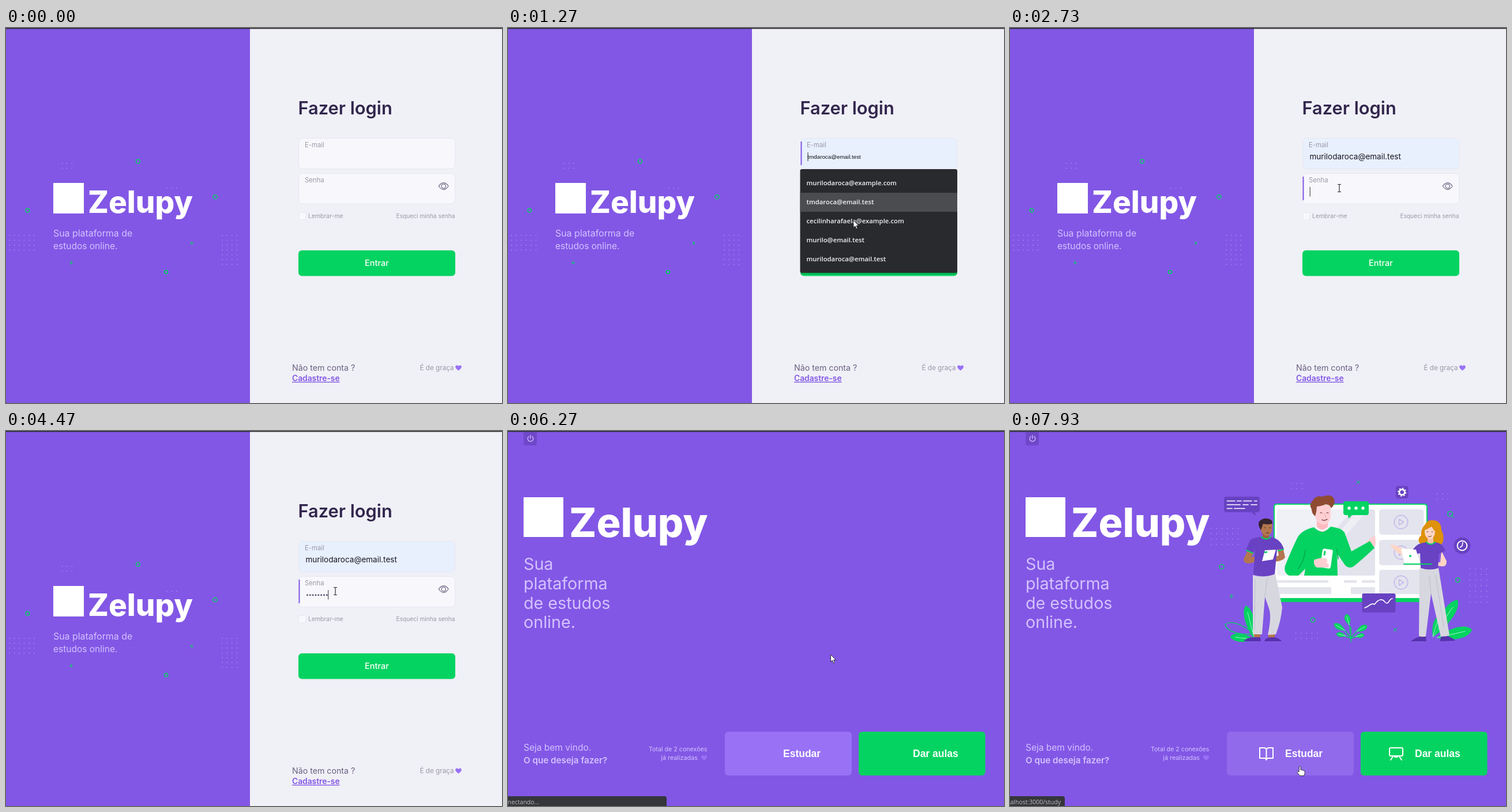
These frames come from a looping animation (860x651 px, 8000 ms). An HTML page:

```html
<!DOCTYPE html>
<html lang="pt-BR">
<head>
<meta charset="utf-8">
<title>Login</title>
<style>
html, body { margin: 0; width: 100%; height: 100%; overflow: hidden; background: #8257e5; }
svg { display: block; width: 860px; height: 651px; font-family: Inter, sans-serif; }
.sans { font-family: "Liberation Sans", sans-serif; }
.ui { font-family: "Open Sans", sans-serif; }
</style>
</head>
<body>
<svg id="stage" viewBox="0 0 860 651" xmlns="http://www.w3.org/2000/svg"></svg>
<script>
const GREEN = '#04d361', PURPLE = '#8257e5', DEEP = '#6842c2', LIGHT = '#9871f5', PALE = '#d4c2ff';
const GRAY = '#9c98a6', SKIN_A = '#b4764f', SKIN_B = '#ffcfd2', SKIN_C = '#ffd6c4';

// ---- markup helpers ----
const text = (x, y, size, str, fill, more = '') =>
  `<text x="${x}" y="${y}" font-size="${size}" fill="${fill}" ${more}>${str}</text>`;
const rect = (x, y, w, h, r, fill, more = '') =>
  `<rect x="${x}" y="${y}" width="${w}" height="${h}" rx="${r}" fill="${fill}" ${more}/>`;
const disc = (x, y, r, fill, more = '') => `<circle cx="${x}" cy="${y}" r="${r}" fill="${fill}" ${more}/>`;
const path = (d, fill, more = '') => `<path d="${d}" fill="${fill}" ${more}/>`;
const line = (d, color, w, more = '') =>
  path(d, 'none', `stroke="${color}" stroke-width="${w}" stroke-linecap="round" stroke-linejoin="round" ${more}`);
const group = (id, body, more = '') => `<g id="${id}" ${more}>${body}</g>`;

function dots(x, y, cols, rows, gap, r = 0.95) {
  let s = '';
  for (let j = 0; j < rows; j++)
    for (let i = 0; i < cols; i++) s += disc(x + i * gap, y + j * gap, r, '#a583f3');
  return s;
}
const ring = (x, y, r) => disc(x, y, r, 'none', `stroke="${GREEN}" stroke-width="1.5"`);
const cross = (x, y, r) =>
  line(`M${x - r} ${y - r}L${x + r} ${y + r}M${x + r} ${y - r}L${x - r} ${y + r}`, GREEN, 1.2);
const plus = (x, y, r) => line(`M${x - r} ${y}H${x + r}M${x} ${y - r}V${y + r}`, GREEN, 1.2);
const heart = (x, y, s) =>
  path('M0 5 C-3 2.6 -5.6 .8 -5.6 -1.8 C-5.6 -5.2 -1.4 -5.8 0 -3 C1.4 -5.8 5.600 -5.2 5.600 -1.8 C5.600 .8 3 2.6 0 5Z',
    LIGHT, `transform="translate(${x} ${y}) scale(${s})"`);

// A leaf from base to tip, widest past the middle; w is its half width.
function leaf(x1, y1, x2, y2, w, hollow) {
  const dx = x2 - x1, dy = y2 - y1, n = Math.hypot(dx, dy);
  const at = (u, v) => `${x1 + dx * u - dy / n * v} ${y1 + dy * u + dx / n * v}`;
  const d = `M${at(0, 0)}C${at(.35, w * 1.1)} ${at(.85, w * 1.5)} ${at(1, 0)}C${at(.85, -w * 1.5)} ${at(.35, -w * 1.1)} ${at(0, 0)}Z`;
  if (hollow) return line(d, GREEN, 1.4);
  return path(d, GREEN) + line(`M${at(0, 0)}L${at(.8, 0)}`, '#e8fff2', .7);
}
const sprig = (x, y, w) =>
  line(`M591 360Q${(x + 591) / 2} ${y + 2} ${x} ${y}`, GREEN, 1.4) +
  leaf(591 + (x - 591) * .35, 360 + (y - 360) * .55, x, y, w);

const brand = (x, y, side, tx, base, size) => rect(x, y, side, side, 0, '#fff') +
  text(tx, base, size, 'Zelupy', '#fff', 'font-weight="800"');

// ---- login page ----
const field = (id, y, label) =>
  rect(507.5, y + .5, 271, 53, 7, '#f8f8fc', `id="${id}Box" stroke="#e6e6f0"`) +
  rect(507.5, y + 6, 2, 41, 0, PURPLE, `id="${id}Bar"`) +
  text(518, y + 16, 11.3, label, GRAY);

const decor =
  dots(97.5, 235, 3, 2, 8.4) + dots(279, 278.3, 3, 1, 8.4) +
  dots(6, 360, 6, 4, 8.5) + dots(375, 360, 4, 7, 8.4) +
  ring(229, 231.5, 3.4) + ring(37.5, 316.7, 3.3) + ring(362.5, 293, 3.6) + ring(277.5, 423.5, 3.1) +
  cross(322, 373.5, 1.7) + plus(113, 407.5, 2.6);

const USERS = ['murilodaroca@example.com', 'tmdaroca@email.test', 'cecilinharafaela@example.com',
  'murilo@email.test', 'murilodaroca@email.test'];

const popup = group('popup',
  rect(507, 247, 272, 181, 3, '#000', 'opacity=".16"') +
  rect(506.5, 245, 272.5, 180, 3, '#292a2d') +
  rect(506.5, 253, 272.5, 33, 0, '#4b4c4f', 'id="pick"') +
  USERS.map((u, i) => text(517.5, 273.3 + 33 * i, 11.3, u, '#f1f3f4', 'class="ui" font-weight="600"')).join(''));

const login = group('login',
  rect(0, 0, 860, 651, 0, '#f0f0f7') + rect(0, 0, 423, 651, 0, PURPLE) + decor +
  brand(82, 269, 53, 142, 321, 53) +
  text(82, 362, 15.9, 'Sua plataforma de', PALE) + text(82, 384, 15.5, 'estudos online.', PALE) +
  text(506.5, 150, 30.8, 'Fazer login', '#32264d', 'font-weight="600"') +
  field('mail', 191, 'E-mail') + field('pass', 252, 'Senha') +
  text(519.5, 227.5, 13.5, USERS[4], '#16141d', 'id="mailText"') +
  text(519.5, 227.3, 9.75, '', '#111', 'id="preview" class="sans"') +
  rect(519.5, 216, 1, 15, 0, '#222', 'id="mailCaret"') +
  group('bullets', [...'00000000'].map((_, i) => disc(522.4 + 4.85 * i, 284.8, 1.55, '#5f5672')).join('')) +
  rect(520, 276, 1, 16.5, 0, '#333', 'id="passCaret"') +
  line('M750.2 274.5Q758.7 262.7 767.2 274.5Q758.7 286.3 750.2 274.5Z', '#6a6180', 1.2) +
  disc(758.7, 274.5, 3.7, 'none', 'stroke="#6a6180" stroke-width="1.2"') +
  rect(507.5, 320.5, 12.5, 12.5, 3, '#f8f8fc', 'stroke="#e6e6f0"') +
  text(524, 330.3, 10.4, 'Lembrar-me', GRAY) +
  text(778.5, 330.3, 10.2, 'Esqueci minha senha', GRAY, 'text-anchor="end"') +
  rect(507, 386, 272, 44.5, 6, GREEN, 'id="enter"') +
  rect(507, 385.5, 272, 45.2, 0, 'none', 'id="focus" stroke="#4f9fe0"') +
  text(643, 413, 14.5, 'Entrar', '#fff', 'text-anchor="middle" font-weight="500"') +
  text(496, 594.7, 14.2, 'Não tem conta ?', '#6a6180') +
  text(496, 613, 13.8, 'Cadastre-se', PURPLE, 'font-weight="600" text-decoration="underline"') +
  text(717.5, 594, 11.7, 'É de graça', GRAY) + heart(784.5, 590, .95) +
  popup);

// ---- home page ----
const play = y => rect(640, y - 22, 77.5, 44, 5, '#e4e4ef') +
  disc(678, y, 11.7, 'none', 'stroke="#c5bae8" stroke-width="1.7"') +
  line(`M674.5 ${y - 5}L682.5 ${y}L674.5 ${y + 5}Z`, '#c5bae8', 1.6);

const screen =
  rect(457, 126, 267, 171, 5, GREEN) + path('M459 132Q459 128 463 128H718Q722 128 722 132V290H459Z', '#fff') +
  rect(463, 136, 170, 115, 4, '#e3e3ed') +
  path('M463 140Q463 136 467 136H596L490 251H467Q463 251 463 247Z', '#f0f0f7') +
  path('M606 136H622L520 251H504Z', '#eeeef5') +
  play(158) + play(211) + play(263) + rect(638, 283, 82, 7, 0, '#fff') +
  rect(463, 259, 89, 4.5, 1, '#e4e4ee') + rect(579, 259, 22, 4.5, 1, '#e4e4ee') + rect(610, 259, 23, 4.5, 1, '#e4e4ee') +
  rect(463, 271, 94, 12, 1, '#e4e4ee') + rect(591, 271, 42, 12, 1, '#e4e4ee');

const teacher =
  path('M616 196Q622 187 629 184L633 181L634 194Q634 203 626 206Z', SKIN_B) +
  path('M527 167Q541 182 556 166Q574 168 580 176L592 209L624 191L632 203Q612 222 596 235Q588 240 581 233L567 212L568 251H510L512 239L500 251H484Q474 246 477 234Q488 206 499 184Q506 172 527 167Z', GREEN) +
  line('M512 207Q510 226 500 239M567 205L569 222', '#07a650', 1.6) +
  path('M532 154H551V166Q549 175 541 175Q534 174 532 167Z', '#ffb9bf') +
  line('M530 166Q541 180 554 165', '#f3f3f8', 3) +
  path('M528 132Q540 122 556 130L556 150Q552 164 543 163Q531 160 529 148Z', SKIN_B) +
  path('M529 148Q523 143 523 136Q518 128 524 122Q530 111 542 114Q557 108 562 118Q565 126 557 134Q555 128 548 127Q538 131 532 131Q532 139 529 148Z', '#8f4b32') +
  line('M538 142H541M549 142H552M541 154Q545 157 550 153', '#5a2b2b', 1.1) +
  line('M545 143L547 149', '#f2a0a6', 1) +
  rect(540, 205, 18, 33, 3, '#fff', 'transform="rotate(8 549 221)"') +
  path('M527 224Q536 219 548 221Q552 225 549 229Q556 231 551 237H532Q526 234 527 224Z', SKIN_B) +
  rect(544, 208, 3, 8, 1, GREEN, 'transform="rotate(8 545 212)"');

const student =
  path('M412 208L405 222Q405 230 414 230L444 223L441 216L418 219L423 211Z', SKIN_A) +
  path('M464 205L474 206L477 219Q474 226 456 227L455 220L466 216Z', SKIN_A) +
  path('M438 176H449V188H438Z', '#9c6242') +
  path('M435 184Q420 185 416 190L409 207L422 212L425 204L422 249Q440 255 459 249L463 206L475 205Q469 187 452 184Q443 190 435 184Z', DEEP) +
  line('M436 184Q444 191 452 184M410 207L421 212M465 208L474 205.5', GREEN, 2.2) +
  path('M433 161Q444 155 455 162L454 174Q451 183 444 182Q435 178 434 169Z', SKIN_A) +
  path('M435 172Q429 163 432 157Q438 151 446 152Q456 153 455 161Q446 163 439 161Z', '#35242f') +
  line('M441 168H443M450 168H452M444 177H449', '#442a22', 1) +
  path('M442 207L461 206L456 223L437 226Z', '#fff') + rect(441, 209, 5, 3, 1, GREEN, 'transform="rotate(-8 443 210)"') +
  path('M423 350H434V361H423ZM448 350H459V361H448Z', SKIN_A) +
  path('M421 250Q441 256 460 248Q466 276 472 306Q470 330 461 353L447 354Q454 322 449 308L442 288L437 353H421Z', '#d7d7e0') +
  line('M442 288L446 256M425 258L424 344', '#bcbccb', .9) +
  path('M405 365Q411 358 422 358H434L435 365ZM441 365Q443 357 458 358Q468 360 471 365Z', '#5632ad');

const girl =
  path('M719 163Q724 153 735 155Q748 157 748 172Q753 180 751 192Q747 201 738 197Q722 203 711 196Q705 188 713 181Q712 171 719 163Z', '#de9209') +
  path('M658 197L670 199L686 206L703 205L706 214L684 217Q672 214 658 197Z', SKIN_C) +
  path('M748 208L757 226Q757 236 749 235L727 232L730 227L746 228Z', SKIN_C) +
  path('M724 182H734V196H724Z', '#f5bfa8') +
  path('M722 193Q707 194 699 205L704 214L711 212L712 238Q728 243 742 238L744 213L755 208Q750 194 736 193Q730 199 722 193Z', DEEP) +
  line('M722 193Q730 200 737 193', GREEN, 1.8) +
  path('M719 168Q728 161 738 168L736 181Q731 190 727 188Q719 184 719 176Z', SKIN_C) +
  path('M717 173Q718 160 729 161Q740 163 740 177Q734 172 731 166Q725 170 717 173Z', '#de9209') +
  line('M723 175H725M731 175H733M725 183Q728 185 731 182', '#6b3b2c', 1) +
  path('M678 206Q678 204 681 204L704 206L711 230H684Z', '#fff') + disc(694, 217, 2, GREEN) +
  line('M683 231H731', GREEN, 2) +
  path('M711 352H720V361H711ZM749 352H758V361H749Z', SKIN_C) +
  path('M710 238Q727 243 743 238L762 355L747 358L730 282L721 356H709Z', '#d7d7e0') +
  line('M730 282L727 252M738 250L752 340', '#bcbccb', .9) +
  path('M696 364Q703 359 711 357H721L722 365H696ZM746 365L747 357L759 356Q769 360 772 364Z', '#5632ad');

const plants =
  leaf(424, 362, 409, 303, 8) + leaf(422, 352, 373, 336, 8, true) + leaf(425, 362, 382, 357, 7) + leaf(426, 350, 422, 318, 5) +
  leaf(733, 358, 776, 293, 10) + leaf(740, 359, 801, 345, 10) + leaf(733, 356, 744, 322, 6) +
  sprig(583, 318, 5) + sprig(562, 335, 5) + sprig(619, 338, 5) + sprig(566, 352, 4) + sprig(614, 354, 4) +
  line('M591 340V366', GREEN, 1.5);

const badges =
  path('M375 114H429Q433 114 433 118V137Q433 141 429 141H425L426 147L418 141H375Q371 141 371 137V118Q371 114 375 114Z', DEEP) +
  line('M376.5 121.5H390M394 121.5H401M405 121.5H419M424 121.5H428M376.5 128H399M404 128H413M418 128H428M376.5 134.5H385M389 134.5H407', '#fff', 1.7) +
  path('M582 122H618Q622 122 622 126V142Q622 146 618 146H593L587 152L586 146H582Q578 146 578 142V126Q578 122 582 122Z', GREEN) +
  [588, 600, 612].map(x => disc(x, 134, 2.7, '#fff')).join('') +
  rect(669, 95.5, 21.5, 21.5, 4, DEEP) + disc(679.7, 106.2, 4.6, 'none', 'stroke="#fff" stroke-width="2.6"') +
  disc(679.7, 106.2, 6.6, 'none', 'stroke="#fff" stroke-width="2" stroke-dasharray="2.6 2.58"') +
  disc(784, 199, 14.5, DEEP) + disc(784, 199, 8.3, 'none', 'stroke="#fff" stroke-width="2"') +
  line('M785 193.5L784 199.5L780.5 202', '#fff', 1.6) +
  rect(610.5, 282, 58, 33, 3, DEEP) +
  line('M615 307Q620 305 624 302T632 301Q637 294 642 293T650 297Q654 301 657 296T663 291', '#fff', 1.7);

const art = group('art',
  dots(488, 91, 3, 2, 9.3) + dots(740.5, 109, 3, 2, 9.3) + dots(349, 169, 6, 4, 9.3) +
  dots(797.5, 239.5, 4, 7, 9.6) + dots(495.5, 351, 5, 2, 9.3) +
  cross(604, 89, 2.2) + cross(668, 345, 2.2) + plus(384, 287, 3.3) +
  ring(367, 235.5, 3.9) + ring(525, 328, 3.9) + ring(776.5, 259, 3.9) + ring(763, 144, 4.2) + line('M766 147L769 150', GREEN, 1.5) +
  plants + screen + teacher + badges + student + girl);

const icons = group('icons',
  line('M444.5 553Q444 550 440 550H433V568H441Q444 568 444.5 571Q445 568 448 568H456V550H449Q445 550 444.5 553V570', '#fff', 2) +
  line('M660 550H679Q681 550 681 552V562Q681 564 679 564H660Q658 564 658 562V552Q658 550 660 550ZM664 565L660 571M675 565L679 571M667 566H672', '#fff', 2));

const status = (id, w, str, end) => group(id,
  path(`M0 634H${w - 4}Q${w} 634 ${w} 638V651H0Z`, '#35363a') +
  text(end, 648, 10.5, str, '#bdc1c6', 'class="ui" text-anchor="end"'));

const home = group('home',
  rect(0, 0, 860, 651, 0, PURPLE) +
  path('M27 2H50V21Q50 25 46 25H31Q27 25 27 21Z', '#6f48c9') +
  line('M36 9.5A4.8 4.8 0 1 0 42 9.5M39 7.5V13', PALE, 1.3) +
  art + brand(27, 115, 69, 106, 184, 70) +
  ['Sua', 'plataforma', 'de estudos', 'online.'].map((s, i) => text(27, 241 + 33.8 * i, 28.7, s, PALE)).join('') +
  text(27, 554.5, 15.5, 'Seja bem vindo.', PALE) +
  text(27, 576.7, 15.2, 'O que deseja fazer?', PALE, 'font-weight="600"') +
  text(345.5, 556, 10.7, 'Total de 2 conexões', PALE, 'text-anchor="end"') +
  text(329, 571, 10.8, 'já realizadas', PALE, 'text-anchor="end"') + heart(340, 567.3, .9) +
  rect(376, 522, 220, 76, 6, LIGHT, 'id="study"') + rect(608, 522, 219.5, 76, 6, GREEN) + icons +
  text(477, 566, 17.5, 'Estudar', '#fff', 'class="sans" font-weight="700"') +
  text(702, 566, 17.5, 'Dar aulas', '#fff', 'class="sans" font-weight="700"') +
  status('wait', 275, 'Conectando...', 54) + status('link', 95, 'localhost:3000/study', 88));

const cursors =
  group('arrow', path('M0 0V12.5L2.9 9.8L5 14.6L7 13.7L5 9.1H9Z', '#fff', 'stroke="#222" stroke-width=".9"')) +
  group('beam', line('M-2.5 -6.5H-.6M.6 -6.5H2.5M0 -6V6M-2.5 6.5H-.6M.6 6.5H2.5', '#222', 1.1)) +
  group('hand', path('M-.5 0Q1.3 -1.5 2 .5V5.5Q4 4.3 4.8 6Q6.5 5 7.3 7Q9.5 6.5 9.3 9.5Q9 13 7.5 15.5H.5Q-2.5 11.5 -4.5 9Q-3.5 6.5 -1 9Z', '#fff', 'stroke="#222" stroke-width=".9"'));

document.getElementById('stage').innerHTML =
  login + home + rect(0, 0, 860, 1.5, 0, '#2a2a2e') + cursors;

// ---- timeline, in ticks of 1/15 s ----
const LOOP = 8000, TICK = 1000 / 15;
const PATH = [[1, 875, 475], [2, 848, 454], [5, 790, 380], [9, 715, 270], [13, 668, 222], [16, 668, 222],
  [17, 640, 262], [18, 615, 308], [19, 599, 334], [22, 596, 396], [24, 594, 429], [26, 594, 418], [28, 593, 403.5],
  [30, 592, 400], [33, 598, 350], [36, 575, 292], [39, 571, 277], [40, 571, 277], [41, 571, 278], [74, 571, 278],
  [77, 500, 340], [80, 372, 437], [82, 374, 437], [85, 520, 415], [87, 556, 400], [90, 559.5, 388.3],
  [101, 559.5, 388.3], [102, 559.5, 389], [108, 559.5, 389], [111, 545, 440], [115, 508, 560], [119, 502, 583]];
const KEYS = [48, 49, 52, 56, 57, 60, 65, 67];
const el = id => document.getElementById(id);
const show = (id, on) => { el(id).style.display = on ? '' : 'none'; };
const within = (k, a, b) => k >= a && k < b;

function pointer(k) {
  const i = PATH.findIndex(p => p[0] >= k);
  if (i <= 0) return PATH[0].slice(1);
  const [a, ax, ay] = PATH[i - 1], [b, bx, by] = PATH[i], u = (k - a) / (b - a);
  return [ax + (bx - ax) * u, ay + (by - ay) * u];
}

function draw(k) {
  const [x, y] = pointer(k), late = pointer(k - 1)[1];
  const atHome = k >= 94, open = within(k, 15, 30), filled = k >= 30;
  const row = Math.min(4, Math.floor((late - 253) / 33));

  show('login', !atHome);
  show('home', atHome);
  show('popup', open);
  show('pick', row >= 0);
  el('pick').setAttribute('y', 253 + 33 * Math.max(0, row));
  el('preview').textContent = open && row >= 0 ? USERS[row] : '';
  el('mailBox').setAttribute('fill', filled || (open && row >= 0) ? '#e8f0fe' : '#f8f8fc');
  show('mailText', filled);
  show('mailBar', within(k, 15, 36));
  show('mailCaret', within(k, 15, 23));

  const typed = KEYS.filter(n => n <= k).length;
  [...el('bullets').children].forEach((c, i) => { c.style.display = i < typed ? '' : 'none'; });
  show('passBar', within(k, 36, 90));
  show('passCaret', within(k, 36, 44) || within(k, 48, 75) || within(k, 83, 90));
  el('passCaret').setAttribute('x', 519.7 + 4.82 * typed);
  const over = k >= 80 && x > 507 && x < 779 && y > 386 && y < 431;
  el('enter').setAttribute('fill', over ? '#04bf58' : GREEN);
  show('focus', k >= 90);

  show('icons', k >= 96);
  show('art', k >= 98);
  show('wait', k < 100);
  const onLink = k >= 114 && y > 522;
  el('study').setAttribute('fill', onLink ? '#916aeb' : LIGHT);
  show('link', k >= 116);

  const inField = !atHome && !open && x > 507 && x < 779 && ((y > 191 && y < 244) || (y > 252 && y < 305));
  const kind = onLink ? 'hand' : inField ? 'beam' : 'arrow';
  for (const id of ['arrow', 'beam', 'hand']) {
    show(id, id === kind && k >= 2);
    el(id).setAttribute('transform', `translate(${x} ${y})`);
  }
}

const start = performance.now();
function loop() {
  const t = (performance.now() - start) % LOOP;
  draw(Math.min(119, Math.floor((t + 4) / TICK)));
  requestAnimationFrame(loop);
}
draw(0);
requestAnimationFrame(loop);
</script>
</body>
</html>
```
